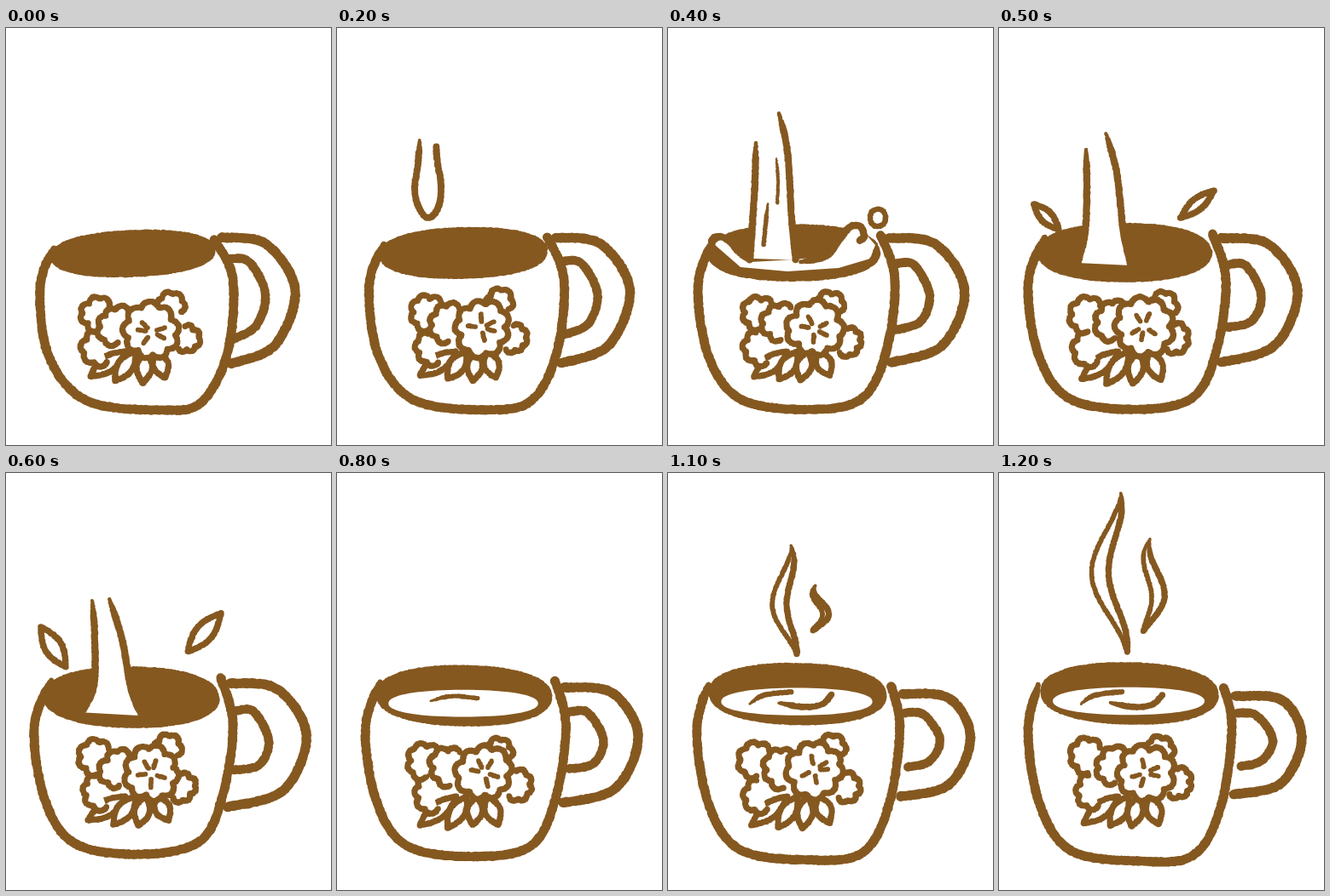
Write an HTML page with a canvas that moves like this. It is 381 px wide and 490 px high and loops after 1.3 s.

```html
<!DOCTYPE html>
<html lang="en">
<head>
<meta charset="utf-8">
<title>Coffee cup</title>
<style>
html, body { margin: 0; width: 100%; height: 100%; overflow: hidden; background: #fff; }
canvas { display: block; width: 381px; height: 490px; }
</style>
</head>
<body>
<canvas id="stage" width="381" height="490"></canvas>
<script>
const ctx = document.getElementById('stage').getContext('2d');
const BROWN = '#855820', WHITE = '#fff', STEP = 100, TICKS = 13;
const { PI, sin, cos, hypot } = Math;

const points = text => text.split(' ').map(p => p.split(',').map(Number));

// Outlines at the start, middle and end of the loop.
const body = [
  '56,258 40,305 50,385 95,438 185,449 230,439 260,380 266,295 243,247',
  '53,243 33,300 46,385 82,436 160,448 228,432 255,375 266,295 251,238',
  '46,249 34,305 48,390 85,444 165,456 228,449 260,392 273,300 263,250'
].map(points);
const handle = [
  '253,246 305,254 339,308 315,373 262,395',
  '262,247 318,254 352,308 325,373 257,393',
  '277,262 332,267 355,312 330,365 273,378'
].map(points);
const loop = [
  '262,271 285,275 304,312 293,350 263,367',
  '268,280 290,280 308,314 297,343 266,349',
  '279,282 302,285 321,313 308,338 282,345'
].map(points);
// Liquid surface: centre, radii, tilt.
const surface = [[149, 265, 93, 24, -0.04], [147, 263, 99, 32, 0.01], [153, 259, 101, 33, 0.02]];

// Both edges of the poured stream, and how they spread.
const pour = [
  ['103,135 102,180 99,230 96,272', '130,100 140,145 145,225 150,274'],
  ['101,150 104,190 103,250 88,282', '121,148 136,195 147,255 160,286']
].map(edges => edges.map(points));

let seed = 1;
const rand = () => (seed = seed * 16807 % 2147483647) / 2147483647;
const jitter = size => (rand() - 0.5) * 2 * size;
const mix = (a, b, t) => Array.isArray(a) ? a.map((v, i) => mix(v, b[i], t)) : a + (b - a) * t;
const blend = (keys, u) => u < 0.5 ? mix(keys[0], keys[1], u * 2) : mix(keys[1], keys[2], u * 2 - 1);

// Smooth Catmull-Rom line through a few points.
function curve(pts) {
  const out = [], get = i => pts[Math.max(0, Math.min(pts.length - 1, i))];
  for (let i = 0; i < pts.length - 1; i++) {
    const [a, b, c, d] = [get(i - 1), get(i), get(i + 1), get(i + 2)];
    for (let t = 0; t <= 1; t += 0.05) {
      out.push([0, 1].map(k => b[k] + t / 2 * (c[k] - a[k] +
        t * (2 * a[k] - 5 * b[k] + 4 * c[k] - d[k] + t * (3 * (b[k] - c[k]) + d[k] - a[k])))));
    }
  }
  return out;
}

// Flattened oval, or a part of it between two angles.
function oval([x, y, rx, ry, tilt], from = 0, to = 2 * PI) {
  const soft = v => Math.sign(v) * Math.abs(v) ** 0.9;
  return Array.from({ length: 81 }, (_, i) => {
    const a = mix(from, to, i / 80), dx = rx * soft(cos(a));
    return [x + dx, y + ry * soft(sin(a)) + dx * tilt];
  });
}

// One side of a wisp, drop or leaf running from one end to the other.
function side([x0, y0, x1, y1, belly, sway, half], sign) {
  const dx = x1 - x0, dy = y1 - y0, len = hypot(dx, dy) || 1;
  return Array.from({ length: 41 }, (_, i) => {
    const s = i / 40, w = sin(PI * s);
    const off = belly * w * w + sway * sin(2 * PI * s) + sign * half * w;
    return [x0 + dx * s + dy / len * off, y0 + dy * s - dx / len * off];
  });
}

// Ragged ring of petals around a point, possibly only a part of it.
function petals(x, y, r, count, from = 0, span = 2 * PI) {
  const whole = span >= 2 * PI, out = [], cusps = [];
  for (let i = 0; i <= count; i++) {
    const a = from + span * i / count, q = r * (0.88 + jitter(0.1));
    cusps.push(whole && i === count ? cusps[0] : [x + q * cos(a), y + q * sin(a)]);
  }
  for (let i = 0; i < count; i++) {
    const [a, b] = [cusps[i], cusps[i + 1]], dx = b[0] - a[0], dy = b[1] - a[1];
    for (let t = 0; t <= 1; t += 0.1) {
      const h = 0.36 * Math.max(0, sin(PI * t)) ** 0.7;
      out.push([a[0] + dx * t + dy * h, a[1] + dy * t - dx * h]);
    }
  }
  return out;
}

// Crayon line: overlapping dabs with a slightly ragged edge.
function crayon(line, width, taper = 0) {
  let done = 0;
  ctx.fillStyle = BROWN;
  ctx.beginPath();
  for (let i = 1; i < line.length; i++) {
    const a = line[i - 1], b = line[i], d = hypot(b[0] - a[0], b[1] - a[1]);
    const n = Math.max(1, Math.ceil(d));
    for (let k = 0; k < n; k++) {
      const thin = taper ? Math.min(1, 0.5 + (done + d * k / n) / taper) : 1;
      const r = width / 2 * thin * (1 + jitter(0.08));
      const [x, y] = mix(a, b, k / n).map(v => v + jitter(0.4));
      ctx.moveTo(x + r, y);
      ctx.arc(x, y, r, 0, 7);
    }
    done += d;
  }
  ctx.fill();
}
function fill(line, colour) {
  ctx.fillStyle = colour;
  ctx.beginPath();
  line.forEach(p => ctx.lineTo(...p));
  ctx.fill();
}
function patch(line, width) {
  fill(line, WHITE);
  crayon(line, width);
}
const stroke = (text, width) => crayon(curve(points(text)), width, 30);

function leaf(shape, width) {
  patch([...side(shape, 1), ...side(shape, -1).reverse()], width);
}
function wisp(shape) {
  crayon(side(shape, -1), 5.5, 40);
  crayon(side(shape, 1), 7, 40);
}

function flower(u) {
  const at = (x, y) => [x + jitter(3), y + jitter(3)];
  const w = 6.8;
  for (let i = 0; i < 4; i++) {
    const [x, y] = at(98 + i * 30, 411 + 5 * sin(PI * i / 3));
    leaf([140 + i * 12, 380, x, y, 0, 0, 9], w);
  }
  patch(petals(...at(112, 376), 22, 4, PI * 0.4, PI), w);
  patch(petals(...at(106, 336), 20, 5, PI * 0.5, PI * 1.3), w);
  patch(petals(...at(192, 324), 16, 4, PI * 0.9, PI * 1.3), w);
  patch(petals(...at(208, 366), 17, 5, -PI * 0.5, PI * 1.2), w);
  patch(petals(...at(133, 347), 23, 5, PI * 0.5, PI * 1.2), w);
  const [x, y] = at(171, 355 - 4 * u);
  patch(petals(x, y, 32, 9, rand()), w);
  for (let i = 0; i < 5; i++) {
    const a = i * 2 * PI / 5 + rand(), tip = r => [x + r * cos(a), y + r * sin(a)];
    crayon([tip(7), tip(17)], 5.5);
  }
}

function splash() {
  fill(points('54,254 62,248 80,262 97,275 149,272 185,268 202,250 215,233 230,240 243,255 237,271 200,282 140,286 85,281'), WHITE);
  stroke('55,262 51,250 59,245 72,250 82,262 97,273', 8);
  stroke('155,275 185,268 200,250 213,234 225,233 230,245 224,250', 8);
  crayon(oval([246, 223, 9, 10, 0]), 6);
}

function stream(tick) {
  const [left, right] = mix(...pour, Math.max(0, tick - 4) / 2).map(curve);
  fill([...left, ...right.reverse()], WHITE);
  crayon(left, 8, 40);
  crayon(right.reverse(), 8, 40);
  if (tick < 5) {
    stroke('127,153 129,180 128,207', 4);
    stroke('117,207 114,235 112,256', 5);
  }
}

// Droplets thrown outward from the rim.
function spray(t) {
  const lift = 26 * (1 - t);
  leaf([70, 228 + lift / 3, 41, 181 + lift, 0, 0, 10 - lift / 8], 7);
  leaf([213, 210 + lift / 2, 252, 165 + lift, 0, 0, 10 - lift / 8], 7);
}

function milk([x, y, rx, ry], tick) {
  fill(oval([x - 1, y + 9, rx * 0.88, ry * 0.49, 0]), WHITE);
  if (tick < 9) return stroke('110,268 135,262 166,265', 5);
  stroke('96,271 113,261 146,257', 6);
  stroke('130,270 158,275 180,272 192,260', 7);
}

function steam(grow) {
  wisp(mix([146, 147, 152, 215, -6, 5, 7], [143, 24, 150, 211, -28, 0, 10], grow));
  if (grow) wisp([mix(169, 177, grow), mix(186, 78, grow), 169, 186, 12, -6, 8 * grow]);
}

function draw(tick) {
  const u = tick / (TICKS - 1), rim = blend(surface, u);
  seed = 101 + tick * 37;
  fill(points('0,0 381,0 381,490 0,490'), WHITE);
  fill(oval(rim), BROWN);
  crayon(oval(rim), 7);

  if (tick === 1 || tick === 2) {
    const drop = points('97,132 95,160 91,190 97,213 108,223 119,210 122,185 118,160 116,138');
    crayon(curve(drop.map(([x, y]) => [x, y - 30 * (2 - tick)])), 7.5, 30);
  }
  if (tick === 4) splash();
  if (tick > 2 && tick < 7) {
    stream(tick);
    crayon(oval(rim, 0, PI), 9);
  }
  if (tick === 5 || tick === 6) spray(tick - 5);
  if (tick > 6) milk(rim, tick);
  if (tick > 9) steam((tick - 10) / 2);

  crayon(curve(blend(handle, u)), 11);
  crayon(curve(blend(loop, u)), 10);
  crayon(curve(blend(body, u)), 10.5, 30);
  flower(u);
}

let shown = -1;
const start = performance.now();
function play(now) {
  const tick = Math.floor(Math.max(0, now - start) / STEP) % TICKS;
  if (tick !== shown) draw(shown = tick);
  requestAnimationFrame(play);
}
play(start);
</script>
</body>
</html>
```
